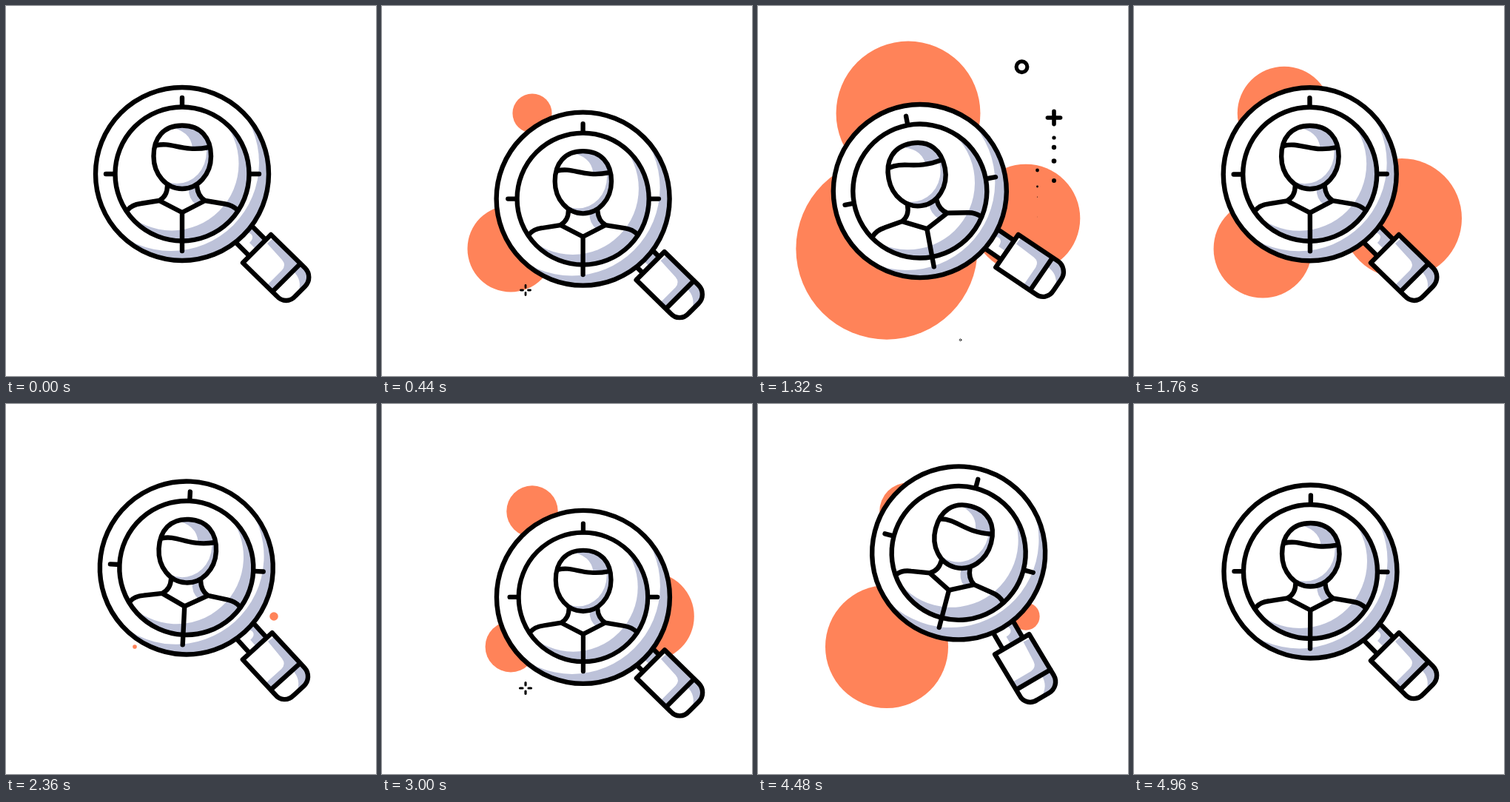
Animation of 500x500 px, one loop 5000 ms. Source, as an HTML page:

```html
<!DOCTYPE html>
<html lang="en">
<head>
<meta charset="utf-8">
<title>Candidate search</title>
<style>
  html, body { margin: 0; width: 100%; height: 100%; overflow: hidden; background: #fff; }
  svg { display: block; width: 100vw; height: 100vh; }

  .line { fill: none; stroke: #000; stroke-width: 6.4; stroke-linecap: round; stroke-linejoin: round; }
  .white { fill: #fff; }
  .shade { fill: #bdc2d9; }

  /* Orange blobs: one 5 s cycle each */
  .blob, .pop { transform-box: fill-box; transform-origin: center; }
  .blob { fill: #ff8359; animation: 5s cubic-bezier(.37, 0, .63, 1) infinite; }
  #big { animation-name: big; }
  #top { animation-name: top; }
  #side { animation-name: side; }
  @keyframes big  { 0%, 50%, 100% { scale: 0 } 19.6% { scale: .952 } 80.9% { scale: 1 } }
  @keyframes top  { 0%, 49.8%, 100% { scale: 0 } 25.2% { scale: .961 } 75.5% { scale: 1 } }
  @keyframes side { 0%, 50%, 100% { scale: 0 } 33.8% { scale: .943 } 66.2% { scale: 1 } }

  /* Small marks: --s is the start in ms within 2.5 s */
  .pop {
    fill: none; stroke: #000; stroke-linecap: round;
    animation: hold 2.5s cubic-bezier(.37, 0, .63, 1) calc(var(--s) * 1ms - 2500ms) infinite;
  }
  .blink { animation-name: blink; }
  .dot { fill: #000; stroke: none; animation-name: dot; }
  @keyframes hold  { 0%, 32%, 100% { scale: 0 } 10%, 20% { scale: 1 } }
  @keyframes blink { 0%, 26%, 100% { scale: 0 } 8%, 16% { scale: 1 } }
  @keyframes dot   { 0%, 24%, 100% { scale: 0 } 8% { scale: 1 } }

  .sink { animation: sink 2.5s linear infinite; }
  .rise { animation: rise 2.5s linear infinite; }
  @keyframes sink { 0%, 24% { translate: 9px -88px } 48.8% { translate: 0 0 } 58%, 100% { translate: -1px 12px } }
  @keyframes rise { 0%, 30.6% { translate: 0 79px } 48.8% { translate: 0 0 } 63%, 100% { translate: 0 -20px } }

  /* Magnifier: 2.5 s cycle of push, then sway */
  #glass, #lens, #view { animation: 2.5s cubic-bezier(.37, 0, .63, 1) infinite; }
  #glass { transform-origin: 354px 343px; animation-name: push, sway; }
  #lens { animation-name: pull; }
  #view { transform-origin: 238px 227px; animation-name: zoom; }
  @keyframes push { 0%, 39.5%, 100% { translate: 0 0 } 19.2% { translate: 24px 23.5px } }
  @keyframes sway { 0%, 40%, 100% { rotate: 0deg } 60.4% { rotate: -15deg } 80.6% { rotate: 15deg } }
  @keyframes pull { 0%, 48%, 100% { translate: 0 0 } 18%, 37% { translate: 10px 10.5px } }
  @keyframes zoom { 0%, 13.2%, 53.2%, 100% { scale: 1 } 34% { scale: .853 } }
</style>
</head>
<body>
<svg viewBox="0 0 500 500">
  <defs>
    <clipPath id="rimClip"><circle cx="238" cy="227" r="117"/></clipPath>
    <clipPath id="viewClip"><circle cx="238" cy="227" r="90.5"/></clipPath>
    <path id="head" d="M238 161.5C263 161.5 277 178 277 203C277 228 259 247 238 247C217 247 199.500 228 199.500 203C199.500 178 213 161.500 238 161.500Z"/>
    <clipPath id="headClip"><use href="#head"/></clipPath>
  </defs>

  <circle id="big" class="blob" cx="174" cy="328" r="146"/>
  <circle id="top" class="blob" cx="203" cy="145" r="102"/>
  <circle id="side" class="blob" cx="362" cy="287" r="87.5"/>
  <g id="marks"></g>

  <g id="glass">
    <path class="white" d="M322 286L352 316L328 338L298 308Z"/>
    <path class="shade" d="M322 286L351 313L337 328L329 320Q336 313 331 308L312 300Z"/>
    <path class="line" d="M322 287L350 315M299 308L327 336"/>
    <path class="white" d="M358 309L404 354C411 361 411 372 404 379L391 392C384 400 373 400 366 392L320 347Z"/>
    <path class="shade" d="M362 313L398 348L360 386L352 378L373 357Q379 350 373 343L353 321Z"/>
    <path class="shade" d="M398 348L404 354C411 361 411 372 404 379L395 388C399 376 397 367 388 358Z"/>
    <path class="line" d="M358 309L404 354C411 361 411 372 404 379L391 392C384 400 373 400 366 392L320 347ZM398 348L360 386"/>

    <g id="lens">
      <circle class="shade" cx="238" cy="227" r="117"/>
      <circle class="white" cx="223" cy="212" r="119" clip-path="url(#rimClip)"/>
      <circle class="line" cx="238" cy="227" r="117"/>
      <g id="view">
        <circle class="shade" cx="238" cy="227" r="90.5"/>
        <circle class="white" cx="224" cy="213" r="90.5" clip-path="url(#viewClip)"/>
        <path class="shade" d="M258 243Q259 257 269 263L257 269Q246 260 247 246Z"/>
        <circle class="line" cx="238" cy="227" r="90.5"/>
        <path class="line" d="M238 124V136M135 227H147M329 227H342M238 279V331"/>
        <path class="line" d="M164 276Q170 268.500 182 267L207 263L238 279L269 263L296 267.500Q306 269 313 276M207 263Q218 257 218 243M258 243Q259 257 269 263"/>
        <use href="#head" class="shade"/>
        <g clip-path="url(#headClip)">
          <ellipse class="white" cx="231" cy="197" rx="40" ry="43"/>
          <path class="shade" d="M218 163Q250 168 252 192Q264 194 274 191L284 160Z"/>
        </g>
        <use href="#head" class="line"/>
        <path class="line" d="M203 188.500C224 183 238 198 274 191"/>
      </g>
    </g>
  </g>
</svg>
<script>
  const marks = document.getElementById('marks');
  const add = html => marks.insertAdjacentHTML('beforeend', html);

  const plus = (x, y, r, w, s) =>
    add(`<path class="pop" style="--s:${s}" stroke-width="${w}" d="M${x - r} ${y}h${2 * r}M${x} ${y - r}v${2 * r}"/>`);

  const spark = (x, y, r, gap, w, s, kind = '') => {
    const n = r - gap;
    add(`<path class="pop ${kind}" style="--s:${s}" stroke-width="${w}"
      d="M${x - r} ${y}h${n}M${x + gap} ${y}h${n}M${x} ${y - r}v${n}M${x} ${y + gap}v${n}"/>`);
  };

  const ring = (x, y, s, move) =>
    add(`<g class="${move}"><circle class="pop" style="--s:${s}" stroke-width="5.6" cx="${x}" cy="${y}" r="8"/></g>`);

  const dots = (x, list) => list.forEach(([y, s]) =>
    add(`<circle class="pop dot" style="--s:${s}" cx="${x}" cy="${y}" r="3.3"/>`));

  spark(136, 335.5, 15, 8, 6.2, 560, 'blink');
  spark(194, 384, 7.5, 4, 3.2, 250);
  ring(274, 446, 600, 'sink');
  ring(356.5, 88, 766, 'rise');
  plus(377.5, 285, 6.6, 4.6, 550);
  plus(400, 151, 8.6, 5.6, 840);
  dots(377.5, [[258, 830], [244, 900], [222, 980]]);
  dots(400, [[178, 1000], [191, 1068], [209.5, 1108], [236, 1160]]);
</script>
</body>
</html>
```
